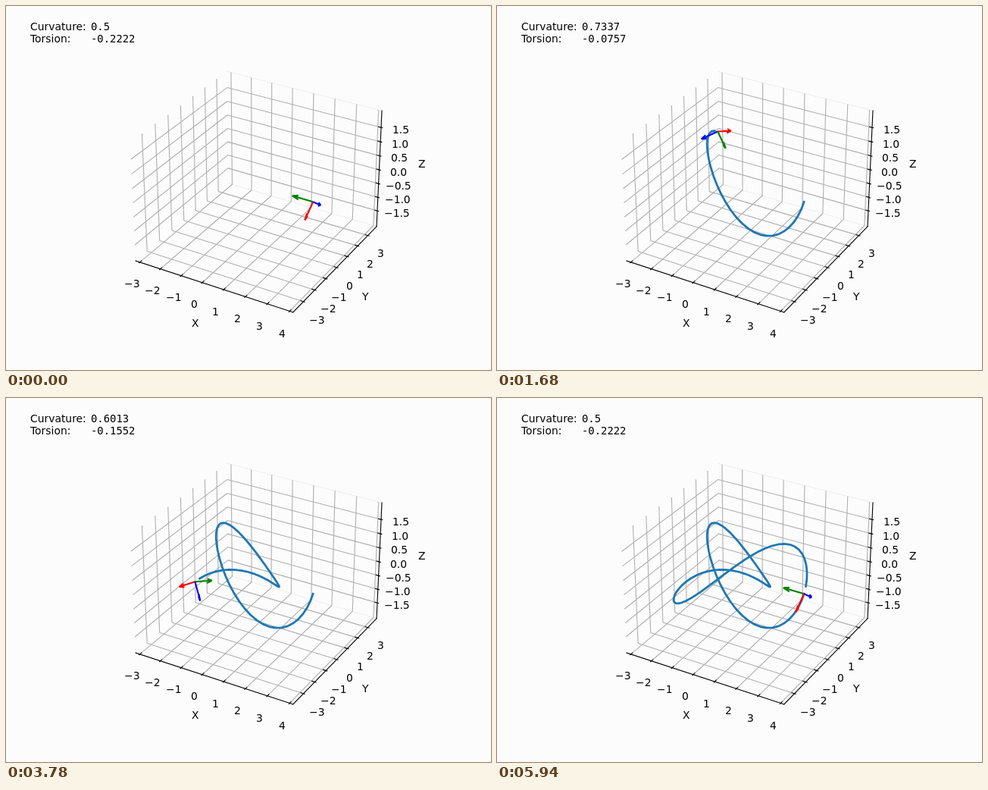
These frames come from a looping animation (640x480 px, 6000 ms). An HTML page with a canvas:

```html
<!DOCTYPE html>
<html lang="en">
<head>
<meta charset="utf-8">
<title>Moving frame on a trefoil knot</title>
<style>
  html, body { margin: 0; width: 100%; height: 100%; overflow: hidden; background: #fcfcfc; }
  canvas { display: block; }
</style>
</head>
<body>
<canvas id="stage" width="640" height="480"></canvas>
<script>
const ctx = document.getElementById('stage').getContext('2d');
const STEPS = 100, STEP_MS = 60;
const FONT = '13.89px "DejaVu Sans", sans-serif';
const MONO = '13.89px "DejaVu Sans Mono", monospace';
const { sin, cos, hypot, min, max, round, PI } = Math;

// Trefoil knot and its derivatives
const position = t => [cos(t) + 2 * cos(2 * t), sin(t) - 2 * sin(2 * t), -sin(3 * t)];
const velocity = t => [-sin(t) - 4 * sin(2 * t), cos(t) - 4 * cos(2 * t), -3 * cos(3 * t)];
const acceleration = t => [-cos(t) - 8 * cos(2 * t), -sin(t) + 8 * sin(2 * t), 9 * sin(3 * t)];
const jerk = t => [sin(t) + 16 * sin(2 * t), -cos(t) + 16 * cos(2 * t), 27 * cos(3 * t)];

const dot = (a, b) => a[0] * b[0] + a[1] * b[1] + a[2] * b[2];
const cross = (a, b) => [
  a[1] * b[2] - a[2] * b[1],
  a[2] * b[0] - a[0] * b[2],
  a[0] * b[1] - a[1] * b[0]
];
const unit = a => a.map(v => v / hypot(...a));
const add = (a, b, k = 1) => a.map((v, i) => v + k * b[i]);

const times = Array.from({ length: STEPS }, (_, i) => 2 * PI * i / (STEPS - 1));
const samples = times.map(position);
const low = [0, 1, 2].map(i => min(...samples.map(p => p[i])) - 1);
const high = [0, 1, 2].map(i => max(...samples.map(p => p[i])) + 1);
const range = high.map((v, i) => v - low[i]);
const arrowScale = range.map(r => r / max(...range));

// Box coordinates run from -0.5 to 0.5 over the data limits
const toBox = (v, i) => (v - low[i]) / range[i] - 0.5;

// Perspective camera: elevation 30, azimuth -60, distance 10
function project(box) {
  const p = [box[0] * 8 / 7, box[1] * 8 / 7, box[2] * 6 / 7];
  const h = Math.sqrt(3) / 2, focal = 369.6 / 0.185;
  const depth = 10 - dot(p, [h / 2, -0.75, 0.5]);
  return [
    333 + focal * dot(p, [h, 0.5, 0]) / depth,
    237.4 - focal * dot(p, [-0.25, h / 2, h]) / depth,
    depth
  ];
}
const projectData = p => project(p.map(toBox));

function stroke(points, color, width, cap = 'butt') {
  ctx.beginPath();
  points.forEach(([x, y]) => ctx.lineTo(x, y));
  ctx.strokeStyle = color;
  ctx.lineWidth = width;
  ctx.lineCap = cap;
  ctx.lineJoin = 'round';
  ctx.stroke();
}

function write(text, x, y, font = FONT) {
  ctx.font = font;
  ctx.fillStyle = '#000';
  ctx.fillText(text, round(x), round(y));
}

function writeCentered(text, x, y) {
  ctx.font = FONT;
  write(text, x - ctx.measureText(text).width / 2, y);
}

// Each axis: its edge followed by the bends of its grid lines
const E = 25 / 48;
const axes = [
  { name: 'X', ticks: [-3, -2, -1, 0, 1, 2, 3, 4], tickDim: 1, path: [[0, -E, -E], [0, E, -E], [0, E, E]] },
  { name: 'Y', ticks: [-3, -2, -1, 0, 1, 2, 3], tickDim: 0, path: [[E, 0, -E], [-E, 0, -E], [-E, 0, E]] },
  { name: 'Z', ticks: [-1.5, -1, -0.5, 0, 0.5, 1, 1.5], tickDim: 0, path: [[E, E, 0], [-E, E, 0], [-E, -E, 0]] }
];

function drawAxes() {
  for (const z of [-E, E]) stroke([[-E, E, z], [E, E, z]].map(project), '#eee', 1);

  const at = (p, i, v) => p.map((c, k) => k === i ? v : c);
  const outward = (p, d) => p.map(c => c + Math.sign(c) * d);

  axes.forEach(({ ticks, path }, i) => {
    for (const v of ticks) stroke(path.map(p => project(at(p, i, toBox(v, i)))), '#b0b0b0', 1.11);
  });

  axes.forEach(({ name, ticks, tickDim, path }, i) => {
    const edge = path[0];
    stroke([-E, E].map(v => project(at(edge, i, v))), '#000', 1.11, 'square');
    const [nameX, nameY] = project(outward(edge, 0.1879));
    writeCentered(name, nameX, nameY + 4.7);

    for (const v of ticks) {
      const p = at(edge, i, toBox(v, i));
      const side = Math.sign(p[tickDim]);
      const ends = [-0.2, 0.1].map(d => project(at(p, tickDim, p[tickDim] + side * d / 12)));
      stroke(ends, '#000', 1.11, 'square');
      const [x, y] = project(at(outward(edge, 0.0864), i, toBox(v, i)));
      writeCentered((i === 2 ? v.toFixed(1) : String(v)).replace('-', '\u2212'), x, y + 11);
    }
  });
}

// A shaft and two head strokes turned 15 degrees in the vertical plane
function makeArrow(origin, direction, color) {
  const v = direction.map((c, i) => c * arrowScale[i]);
  const flat = hypot(v[0], v[1]) || 1e-9;
  const side = [-v[0] * v[2] / flat, -v[1] * v[2] / flat, flat];
  const tip = add(origin, v);
  const angle = PI / 12;
  const barbs = [1, -1].map(s =>
    add(add(tip, v, -0.3 * cos(angle)), side, -0.3 * s * sin(angle)));
  const lines = [[origin, tip], ...barbs.map(b => [tip, b])].map(l => l.map(projectData));
  return { color, lines, depth: min(...lines.flat().map(p => p[2])) };
}

function draw(step) {
  const t = times[step];
  const d1 = velocity(t), d2 = acceleration(t);
  const bend = cross(d1, d2);
  const curvature = hypot(...bend) / hypot(...d1) ** 3;
  const torsion = dot(bend, jerk(t)) / dot(bend, bend);
  const tangent = unit(d1), binormal = unit(bend);

  ctx.fillStyle = '#fcfcfc';
  ctx.fillRect(0, 0, 640, 480);
  drawAxes();
  if (step > 1) stroke(samples.slice(0, step).map(projectData), '#1f77b4', 2.78, 'square');

  [[tangent, 'red'], [cross(binormal, tangent), 'green'], [binormal, 'blue']]
    .map(([direction, color]) => makeArrow(samples[step], direction, color))
    .sort((a, b) => b.depth - a.depth)
    .forEach(a => a.lines.forEach(line => stroke(line, a.color, 2.08)));

  [['Curvature:', curvature, 32], ['Torsion:', torsion, 48]].forEach(([label, value, y]) => {
    write(label, 32, y);
    write(String(+value.toFixed(4)), 112, y, MONO);
  });
}

function tick() {
  draw(Math.floor(performance.now() / STEP_MS) % STEPS);
  requestAnimationFrame(tick);
}
tick();
</script>
</body>
</html>
```
